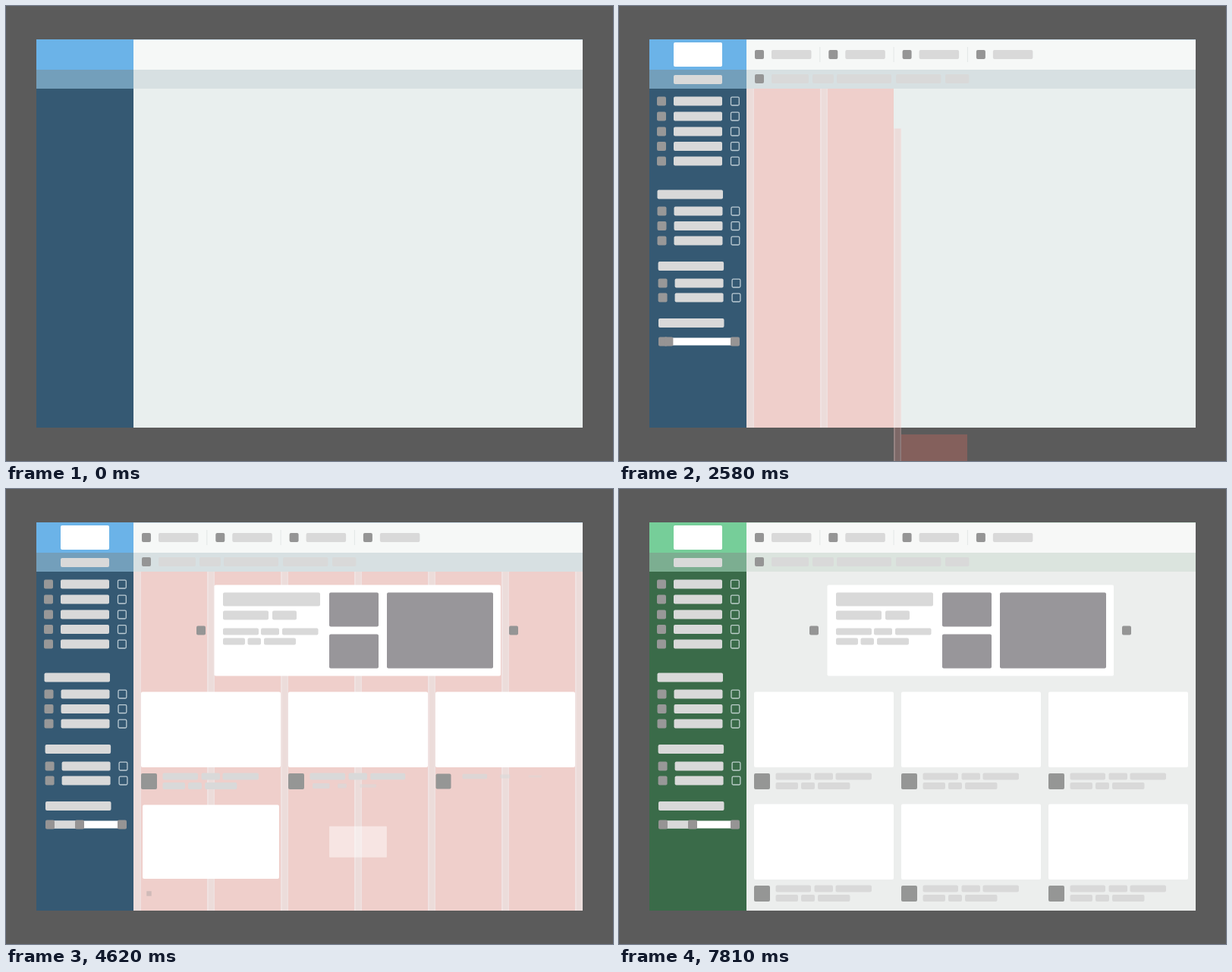
Animation, 800 px wide and 600 px high, one loop 8000 ms. Source, as an HTML page with a canvas:

```html
<!DOCTYPE html>
<html lang="en">
<head>
<meta charset="utf-8">
<title>Page layout build</title>
<style>
html, body { margin: 0; width: 100%; height: 100%; overflow: hidden; background: #5b5b5b; }
canvas { display: block; width: 800px; height: 600px; }
</style>
</head>
<body>
<canvas id="stage" width="800" height="600"></canvas>
<script>
const ctx = document.getElementById('stage').getContext('2d');
const LOOP = 8000;
const POP = 300;
const BAR = '#d9d9d9';
const ICON = '#959595';
const PHOTO = '#98969a';

// Each theme colour fades from blue to green.
const THEME = {
  logo: [[107, 179, 232], [118, 206, 153]],
  label: [[115, 159, 187], [124, 174, 145]],
  side: [[53, 89, 115], [58, 107, 73]],
  top: [[246, 248, 247], [247, 248, 247]],
  strip: [[215, 224, 226], [219, 228, 222]],
  page: [[233, 239, 238], [236, 238, 237]],
  edge: [[207, 224, 236], [215, 234, 223]]
};

let now = 0;

const clamp = v => Math.max(0, Math.min(1, v));
const easeOut = u => 1 - (1 - u) * (1 - u);
const progress = (start, dur) => clamp((now - start) / dur);

function themeColor(name) {
  const step = now < 6610 ? 0 : Math.min(7, Math.floor((now - 6610) / 200) + 1);
  const [a, b] = THEME[name];
  const mix = a.map((v, i) => Math.round(v + (b[i] - v) * step / 7));
  return `rgb(${mix})`;
}

function rect(x, y, w, h, color) {
  ctx.fillStyle = color;
  ctx.fillRect(x, y, w, h);
}

function round(x, y, w, h, color, r = 2) {
  ctx.fillStyle = color;
  ctx.beginPath();
  ctx.roundRect(x, y, w, h, Math.min(r, w / 2, h / 2));
  ctx.fill();
}

// Grows a box from its centre while it fades in.
function pop(start, x, y, w, h, color, r = 2) {
  const s = easeOut(progress(start, POP));
  if (s <= 0) return;
  ctx.globalAlpha = Math.min(1, s * 1.1);
  round(x + w * (1 - s) / 2, y + h * (1 - s) / 2, w * s, h * s, color, r * s);
  ctx.globalAlpha = 1;
}

// Draws a part offset by (dx, dy) that eases back to its place.
function slide(start, dur, dx, dy, draw) {
  const u = progress(start, dur);
  if (u <= 0) return;
  const rest = Math.pow(1 - u, 3);
  ctx.save();
  ctx.translate(dx * rest, dy * rest);
  draw();
  ctx.restore();
}

function drawPage() {
  rect(0, 0, 800, 600, '#5b5b5b');
  rect(168, 109, 592, 447, themeColor('page'));
  rect(168, 44, 592, 40, themeColor('top'));
  rect(168, 44, 592, 1, themeColor('edge'));
  rect(168, 84, 592, 25, themeColor('strip'));
  rect(40, 44, 128, 40, themeColor('logo'));
  rect(40, 84, 128, 25, themeColor('label'));
  rect(40, 109, 128, 447, themeColor('side'));
}

function drawHeader() {
  slide(180, 420, 0, -90, () => round(72, 48, 64, 32, '#fff'));
  slide(360, 420, -140, 0, () => round(72, 91, 64, 12, BAR));
  for (let i = 0; i < 4; i++) {
    const x = 179 + i * 97.3;
    const t = 420 + i * 85;
    pop(t, x, 58, 12, 12, ICON);
    pop(t + 40, x + 22, 58, 52.5, 12, BAR);
    if (i < 3) pop(t + 80, x + 85.3, 54, 1, 20, '#e3e6e6', 0);
  }
  pop(860, 179, 90, 12, 12, ICON);
  [[201, 49], [255, 28], [287, 72], [365, 59.5], [430, 31.5]].forEach(([x, w], i) =>
    pop(1023 + 28 * i, x, 90, w, 12, BAR));
}

function drawRow(x, y) {
  round(x, y - 6, 12, 12, '#989898');
  round(x + 22, y - 6, 64, 12, BAR);
  ctx.strokeStyle = 'rgba(222,232,236,.8)';
  ctx.lineWidth = 1.3;
  ctx.beginPath();
  ctx.roundRect(x + 97.5, y - 5.3, 10.8, 10.8, 1.5);
  ctx.stroke();
}

function drawSlider() {
  const knob = 52 + 39 * (1 - Math.pow(1 - progress(2515, 960), 3));
  rect(58, 437.5, 95, 10, '#fff');
  rect(58, 437.5, knob - 52, 10, BAR);
  for (const x of [52, knob, 147]) round(x, 436.5, 12, 12, '#969494');
}

function drawSidebar() {
  const groups = [
    { x: 50, rows: [125.5, 145.5, 165.5, 185, 204.5] },
    { x: 50.5, head: 248.5, rows: [270.5, 290, 309.5] },
    { x: 51.6, head: 343, rows: [365.5, 384.5] },
    { x: 52, head: 418, rows: [] }
  ];
  let t = 1230;
  const enter = draw => {
    slide(t, 400, -170, 0, draw);
    t += 70;
  };
  for (const g of groups) {
    if (g.head) enter(() => round(g.x, g.head - 6, 86.5, 12, BAR));
    for (const y of g.rows) enter(() => drawRow(g.x, y));
  }
  enter(drawSlider);
}

// Gutters and columns rise one by one, then drop out again.
function drawGrid() {
  for (let i = 0; i < 13; i++) {
    const rise = easeOut(progress(2226 + 70 * i, 110));
    const fall = Math.pow(progress(5050 + 45 * i, 170), 2);
    if (rise <= 0 || fall >= 1) continue;
    const y = 109 + 491 * (1 - rise + fall);
    const x = 168 + Math.floor(i / 2) * 97;
    if (i % 2) {
      rect(x + 10, y, 87, 447, 'rgba(255,112,95,.25)');
    } else {
      rect(x, y, 10, 447, 'rgba(245,150,148,.22)');
      if (i > 0) rect(x, y, 2, 447, 'rgba(255,255,255,.18)');
      rect(x + 8.5, y, 1.5, 447, 'rgba(255,255,255,.15)');
    }
  }
}

function drawBanner() {
  pop(3040, 274.5, 126.5, 377.5, 120, '#fff');
  pop(3210, 286, 136.5, 128, 18, BAR);
  pop(3308, 286, 160.5, 60, 12, BAR);
  pop(3330, 351, 160.5, 32, 12, BAR);
  [[286, 47], [336, 24], [364, 47.5]].forEach(([x, w], i) =>
    pop(3393 + 35 * i, x, 183.5, w, 9, BAR));
  [[286, 29], [318.5, 17.5], [340, 42]].forEach(([x, w], i) =>
    pop(3498 + 35 * i, x, 196.5, w, 9, BAR));
  pop(3520, 426, 136.5, 65, 45, PHOTO);
  pop(3600, 426, 191.5, 65, 45, PHOTO);
  pop(3680, 502, 136.5, 140, 100, PHOTO);
  pop(3760, 251, 180.5, 12, 12, ICON);
  pop(3800, 663, 180.5, 12, 12, ICON);
}

function drawCard(i) {
  const x = 178 + (i % 3) * 194;
  const y = 267.5 + Math.floor(i / 3) * 148;
  const t = 3810 + 185 * i;
  const icon = t + 204;
  pop(t, x, y, 184, 99.5, '#fff');
  pop(icon, x, y + 107.5, 21, 21, '#959695');
  [[28.5, 46.5], [79.5, 24.5], [107.5, 47.5]].forEach(([dx, w], k) =>
    pop(icon + 100 + 38 * k, x + dx, y + 107, w, 9, BAR));
  [[28.5, 29.5], [62, 18], [84, 42.5]].forEach(([dx, w], k) =>
    pop(icon + 268 + 32 * k, x + dx, y + 119.5, w, 9, BAR));
}

function frame(time) {
  now = time % LOOP;
  drawPage();
  drawHeader();
  drawSidebar();
  drawGrid();
  drawBanner();
  for (let i = 0; i < 6; i++) drawCard(i);
}

let origin = null;
function tick(stamp) {
  if (origin === null) origin = stamp;
  frame(stamp - origin);
  requestAnimationFrame(tick);
}
requestAnimationFrame(tick);
</script>
</body>
</html>
```
